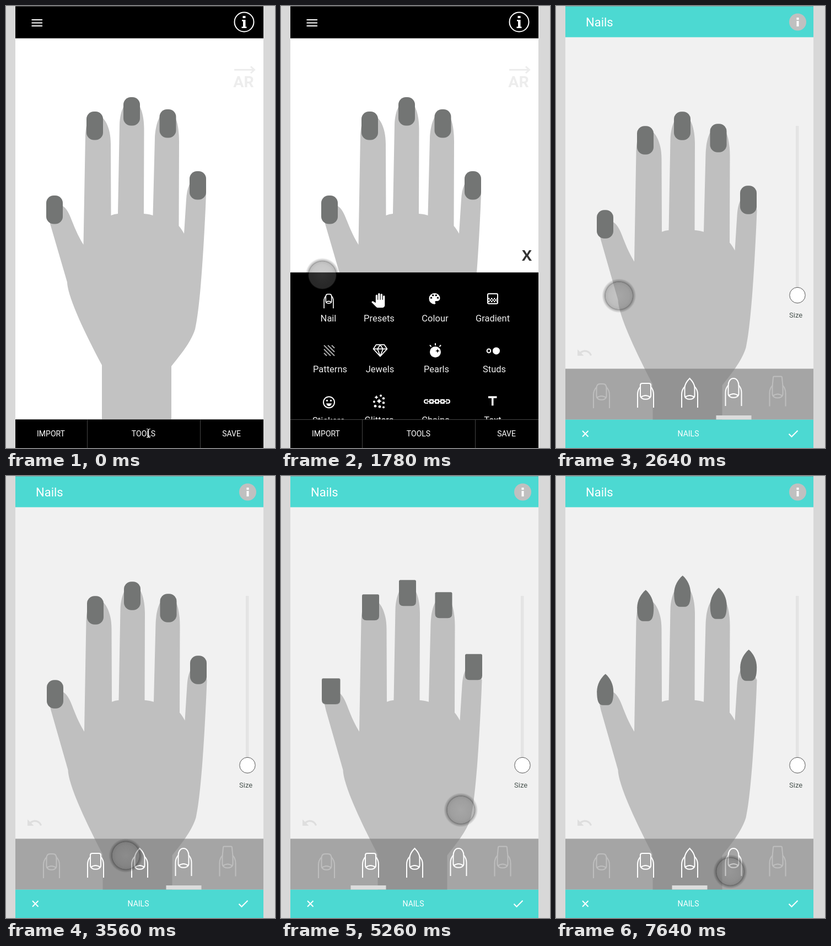
An HTML page for the animation above (8 s loop, 488 by 800 pixels).

```html
<!DOCTYPE html>
<html lang="en">
<head>
<meta charset="utf-8">
<title>Nail designer</title>
<style>
  html, body { margin: 0; width: 100%; height: 100%; overflow: hidden; background: #d8d8d8; }
  svg { display: block; width: 488px; height: 800px; font-family: Roboto, sans-serif; }
  text { fill: #fff; }
  .mid { text-anchor: middle; }
  .line { fill: none; stroke: #fff; stroke-width: 2; }
  .bar { font-size: 14px; text-anchor: middle; }
  .label { font-size: 16.5px; text-anchor: middle; fill: #eee; }
</style>
</head>
<body>
<svg viewBox="0 0 488 800">
  <defs>
    <clipPath id="phone"><path d="M17 0H467V800H17z"/></clipPath>
    <radialGradient id="glass">
      <stop offset="0" stop-color="#808080" stop-opacity=".38"/>
      <stop offset=".6" stop-color="#6c6c6c" stop-opacity=".38"/>
      <stop offset=".78" stop-color="#606060" stop-opacity=".42"/>
      <stop offset=".8" stop-color="#303030" stop-opacity=".5"/>
      <stop offset=".85" stop-color="#000" stop-opacity=".25"/>
      <stop offset="1" stop-color="#000" stop-opacity="0"/>
    </radialGradient>
    <path id="hand" d="M174 750V650C150 605 112 530 111 500L80 394 75 372 90 355 103 362C118 372 118 395 140.500 432L144 235C145 212 150 196 163 196C178 198 190 218 190 250L190.500 379Q196 376.500 203 376L206 215C207 190 215 172 228 170C243 172 250.500 195 250.500 222L250 376Q258 376.500 266.500 379L270 240C271 215 278 192 293 190C308 192 314 215 314 245L313.500 398Q318 403 323 412L327 350C328 330 334 315 345 308L363 340 362 365C358 450 352 545 343 585C335 610 315 633 300 652V750z"/>
    <rect id="round" width="30" height="51.500" rx="13.500"/>
    <path id="square" d="M0-.5Q0-3 2.500-3H28.500Q31-3 31-.5V36Q31 44 23 44H8Q0 44 0 36z"/>
    <path id="point" d="M15.500-11C24-4 30 8 30 21C30 38 27 45.500 19 45.500H11C3 45.500 0 38 0 21C0 8 7-4 15.500-11z"/>
    <g id="finger">
      <path d="M-14.500 44V20C-14.500 13-12 9-9 6M14.500 44V20C14.500 13 12 9 9 6M-9 25.500Q0 18.500 9 25.500"/>
    </g>
    <path id="tipRound" d="M-9 8Q-9 0-3 0H3Q9 0 9 8V22C9 31-9 31-9 22z"/>
    <path id="tipSquare" d="M-9.500 3Q-9.500 0-6 0H6Q9.500 0 9.500 3V22C9.500 31-9.500 31-9.500 22z"/>
    <path id="tipPoint" d="M0-9C5-4 9 2 9 8V22C9 31-9 31-9 22V8C-9 2-5-4 0-9z"/>
    <path id="tipOval" d="M0-6C6-6 9.500 0 9.500 7V22C9.500 31-9.500 31-9.500 22V7C-9.500 0-6-6 0-6z"/>
    <path id="tipLong" d="M-8-8Q-8-10-6-10H6Q8-10 8-8L9.500 8V22C9.500 31-9.500 31-9.500 22V8z"/>
    <path id="link" class="line" d="M7-3H3a3 3 0 0 0 0 6H7M9-3h4a3 3 0 0 1 0 6H9M5 0h6" stroke-width="1.500"/>
  </defs>

  <g clip-path="url(#phone)">
    <!-- main screen -->
    <path fill="#fff" d="M17 0H467V800H17z"/>
    <path d="M17 0H467V58.500H17z"/>
    <path d="M17 .5H467" stroke="#555"/>
    <path class="line" d="M46.500 25h19.500M46.500 30.500h19.500M46.500 36h19.500"/>
    <circle class="line" cx="432" cy="29" r="17.500"/>
    <path fill="#fff" d="M429.500 18h5v4h-5zM428 25h6.500v12.500h2V40h-9v-2.500h2.500v-10h-2z"/>
    <g fill="none" stroke="#ededed" stroke-width="3"><path d="M414 115.500H450M444 109.500l6.500 6-6.500 6"/></g>
    <text class="mid" x="431" y="147" font-size="28.500" font-weight="700" style="fill:#ededed">AR</text>
    <use href="#hand" fill="#c2c2c2"/>
    <g id="nailsMain" fill="#737574"></g>

    <g id="panel">
      <path d="M17 438H467V800H17z"/>
      <text class="mid" x="446" y="417" font-size="27" font-weight="700" style="fill:#333;font-family:'Noto Sans',sans-serif">X</text>
      <g id="labels"></g>
      <g class="line" transform="translate(86.500 477.500) scale(.58)" style="stroke-width:2.800"><use href="#finger"/><use href="#tipRound"/></g>
      <path fill="#fff" transform="translate(163 475.500) scale(1.100)" d="M23 5.500V20c0 2.200-1.800 4-4 4h-7.300c-1.080 0-2.100-.43-2.850-1.190L1 14.830s1.260-1.230 1.300-1.250c.5-.4 1-.35 1.390-.13L8 15.910V4a1.500 1.500 0 0 1 3 0v7h1V1.500a1.500 1.500 0 0 1 3 0V11h1V2.500a1.500 1.500 0 0 1 3 0V11h1V5.500a1.500 1.500 0 0 1 3 0z"/>
      <g transform="translate(278.500 485.500)">
        <path fill="#fff" d="M0-10a10 10 0 0 0 0 20c2 0 2.300-1.800 1.300-2.900c-1-1.200 0-2.700 1.300-2.700H5c3 0 5-2.500 5-5.500C10-6 5.500-10 0-10z"/>
        <circle cx="-6" cy="-1.500" r="1.700"/><circle cx="-2.800" cy="-6" r="1.700"/><circle cx="2.800" cy="-6" r="1.700"/><circle cx="6" cy="-1.500" r="1.700"/>
      </g>
      <rect class="line" x="375" y="476.500" width="18" height="18" rx="2"/>
      <path fill="none" stroke="#fff" stroke-width="2.500" stroke-dasharray="2.500" d="M376 485.500h16M378.500 488h14M376 490.500h16"/>
      <path fill="none" stroke="#b5b5b5" stroke-width="2" d="M78 575l5-5M78 582l12-12M78 589l19-19M85 589l12-12M92 589l5-5" transform="matrix(-1 0 0 1 175 0)"/>
      <path class="line" style="stroke-width:1.700" stroke-linejoin="round" d="M172.500 569h15l5 7.500L180 590l-12.500-13.500zM167.500 576.500h25M175 576.500l5 13 5-13M175 576.500l5-7.500 5 7.500"/>
      <circle cx="280" cy="582" r="10" fill="#fff"/>
      <path class="line" d="M280 566v4M270 569.500l2.500 3M290 569.500l-2.500 3"/>
      <path d="M284 576l1 3 3 1-3 1-1 3-1-3-3-1 3-1z"/>
      <circle class="line" cx="377" cy="580" r="3.300"/><circle cx="390.500" cy="580" r="6.500" fill="#fff"/>
      <circle class="line" cx="87" cy="673" r="10"/>
      <path fill="#fff" d="M82 675h10q-1.500 5-5 5t-5-5z"/><circle cx="83.500" cy="670" r="1.600" fill="#fff"/><circle cx="90.500" cy="670" r="1.600" fill="#fff"/>
      <g id="glitter" fill="#fff"></g>
      <use href="#link" x="260" y="671.500"/><use href="#link" x="270" y="671.500"/><use href="#link" x="280" y="671.500"/><use href="#link" x="290" y="671.500"/>
      <path fill="#fff" d="M376 662h15.500v3.500h-6V679h-3.500v-13.500h-6z"/>
    </g>

    <path d="M17 748.500H467V800H17z"/>
    <path d="M17 748.500H467M147.500 749V800M352.500 749V800" stroke="#444"/>
    <g class="bar"><text x="81.500" y="779">IMPORT</text><text x="249.500" y="779">TOOLS</text><text x="409" y="779">SAVE</text></g>
    <path id="beam" class="line" style="stroke-width:1.200" d="M255 765.500q3 0 3.500 1.500q.5-1.500 3.500-1.500M258.500 767v13M255 781q3 0 3.500-1.500q.5 1.500 3.500 1.500"/>

    <!-- nail shape screen -->
    <g id="shapes">
      <path fill="#f1f1f1" d="M17 0H467V800H17z"/>
      <use href="#hand" fill="#bfbfbf" transform="translate(1.500 23) scale(1 1.018)"/>
      <g id="nailsRound" fill="#737574"></g>
      <g id="nailsSquare" fill="#737574"></g>
      <g id="nailsPoint" fill="#737574"></g>
      <path fill="#4cd9d2" d="M17 0H467V56.500H17zM17 748.500H467V800H17z"/>
      <path d="M17 .5H467" stroke="#7fa5a3"/>
      <text x="54" y="37" font-size="22">Nails</text>
      <circle cx="438.500" cy="29" r="15.500" fill="#c0c0c0"/>
      <path fill="#fff" d="M436.500 21h4v4h-4zM436.500 27h4v10h-4z"/>
      <path fill="#e4e4e4" d="M435 217h5.500v300h-5.500z"/>
      <circle cx="438" cy="523.500" r="14.200" fill="#fff" stroke="#555"/>
      <text x="423" y="564" font-size="13" style="fill:#4a5550">Size</text>
      <path fill="#dedede" transform="translate(36.500 612.600) scale(1.270)" d="M12.500 8c-2.650 0-5.050.99-6.900 2.600L2 7v9h9l-3.620-3.620c1.390-1.160 3.160-1.880 5.120-1.880 3.540 0 6.550 2.310 7.600 5.500l2.370-.78C21.080 11.030 17.150 8 12.500 8z"/>
      <path fill="#7a7a7a" fill-opacity=".64" d="M17 656.500H467V748.500H17z"/>
      <g id="tips" class="line"></g>
      <path id="marker" fill="#dcdcdc" d="M0 741h64v7.500H0z"/>
      <path class="line" d="M48 769l10.500 10.500M58.500 769l-10.500 10.500M422.500 774.500l5 5 11-11"/>
      <text class="bar" x="240" y="779">NAILS</text>
      <text id="caption" class="mid" x="243" y="567" font-size="22" style="fill:#333">Square Tip</text>
    </g>
  </g>
  <circle id="ball" r="31" fill="url(#glass)"/>
</svg>
<script>
const LOOP = 8000;
const $ = id => document.getElementById(id);
const fill = (id, items, draw) => { $(id).innerHTML = items.map(draw).join(''); };

const nails = [[73, 343], [146, 191], [213, 165], [278.5, 187], [333, 299]];
const place = (shape, dx, dy) => ([x, y], i) => {
  const wide = shape === 'square' && i === 0 ? 1.08 : 1;
  return `<use href="#${shape}" transform="translate(${x + dx} ${y + dy}) scale(${wide} 1)"/>`;
};
fill('nailsMain', nails, place('round', 0, 0));
fill('nailsRound', nails, place('round', 1, 26.3));
fill('nailsSquare', nails, place('square', 1, 26.3));
fill('nailsPoint', nails, place('point', 1.2, 26.3));

fill('labels', [
  ['Nail', 86, 527], ['Presets', 178, 527], ['Colour', 279.5, 527], ['Gradient', 384, 527],
  ['Patterns', 89, 619], ['Jewels', 179.5, 619], ['Pearls', 282, 619], ['Studs', 387, 619],
  ['Stickers', 86.5, 712], ['Glitters', 178, 711], ['Chains', 280.5, 711], ['Text', 384, 711]
], ([name, x, y]) => `<text class="label" x="${x}" y="${y}">${name}</text>`);

fill('glitter', [
  [173, 664, 3.6], [181, 661, 2], [186, 666, 2.2], [169, 672, 2], [178, 671, 4.5],
  [186, 674, 2.2], [171, 680, 2.4], [179, 681, 2.4], [186, 682, 2]
], ([x, y, r]) => r > 3
  ? `<path transform="translate(${x} ${y}) scale(${r})" d="M0-1L.35-.35 1 0 .35.35 0 1-.35.35-1 0-.35-.35z"/>`
  : `<circle cx="${x}" cy="${y}" r="${r}"/>`);

fill('tips', [
  ['Round', 82.5, 684, 0.27], ['Square', 162.5, 683, 1], ['Point', 242.5, 683, 1],
  ['Oval', 322, 680, 1], ['Long', 402, 680.5, 0.27]
], ([tip, x, y, o]) =>
  `<g transform="translate(${x} ${y})" opacity="${o}"><use href="#finger"/><use href="#tip${tip}"/></g>`);

const clamp = v => Math.min(1, Math.max(0, v));
const span = (t, a, b) => clamp((t - a) / (b - a));
const smooth = p => p * p * (3 - 2 * p);
const easeOut = p => 1 - (1 - p) ** 2;

// time, x, y
const path = [
  [1010, 199, 667], [1630, 75, 487], [2560, 75, 487], [2640, 114, 524], [3100, 255, 673],
  [3270, 255, 673], [4020, 158, 709], [4580, 158, 709], [4780, 455, 600], [4940, 376, 539],
  [5720, 255, 698], [6330, 255, 698], [6410, 251, 709], [6490, 255, 711],
  [6800, 255, 711], [7580, 316, 716]
];

function ballAt(t) {
  let i = 0;
  while (i < path.length - 2 && t >= path[i + 1][0]) i++;
  const [t0, x0, y0] = path[i], [t1, x1, y1] = path[i + 1];
  const p = span(t, t0, t1);
  return [x0 + (x1 - x0) * p, y0 + (y1 - y0) * p];
}

const show = (id, on) => { $(id).style.visibility = on ? 'visible' : 'hidden'; };
const move = (id, x, y) => $(id).setAttribute('transform', `translate(${x} ${y})`);
const fade = (id, o) => { $(id).style.opacity = o; };

function render(t) {
  const open = easeOut(span(t, 190, 700)) - span(t, 1740, 2065);
  show('panel', t >= 230 && t < 2065);
  move('panel', 0, 350 * (1 - open));
  show('beam', t < 1010);

  move('shapes', 451 * (1 - smooth(span(t, 1805, 2320))), 0);
  const square = span(t, 4150, 4450), point = span(t, 6770, 7100);
  fade('nailsRound', 1 - square);
  fade('nailsSquare', square * (1 - point));
  fade('nailsPoint', point);
  fade('caption', span(t, 4150, 4480) - span(t, 4620, 4940));
  move('marker', t < 5030 ? 290.5 : t < 7640 ? 126.5 : 210.5, 0);

  show('ball', t >= 1010);
  move('ball', ...ballAt(t));
}

function tick() {
  render(performance.now() % LOOP);
  requestAnimationFrame(tick);
}
tick();
</script>
</body>
</html>
```
